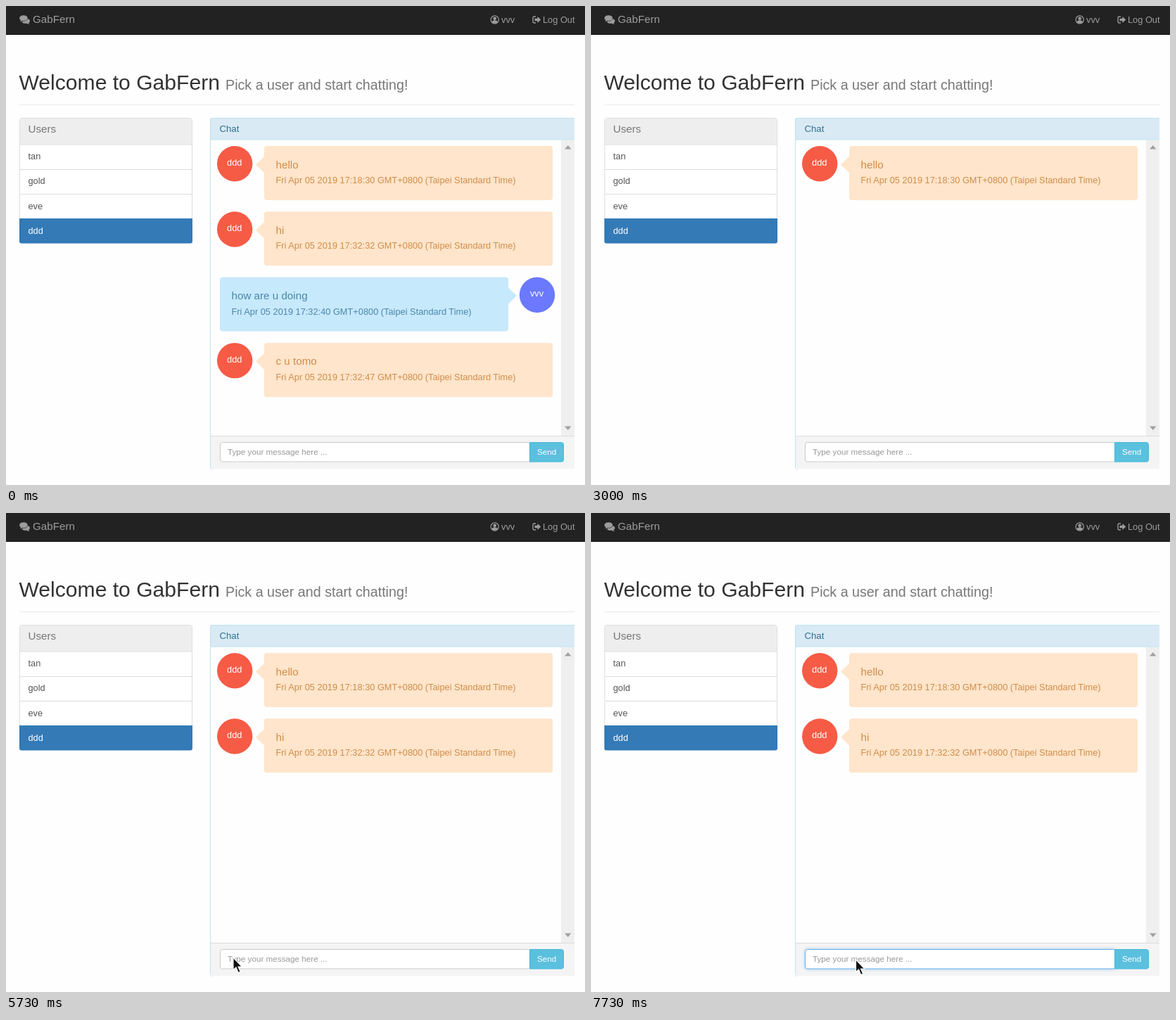
Write an HTML page that moves like this. It is 823 px wide and 681 px high and loops after 8000 ms.

```html
<!DOCTYPE html>
<html lang="en">
<head>
<meta charset="utf-8">
<title>Chat</title>
<style>
html, body { margin: 0; width: 100%; height: 100%; overflow: hidden; background: #fefefe; }
svg { display: block; font-family: "Liberation Sans", Arial, sans-serif; font-size: 12.8px; }
.head { font-size: 15.2px; }
.small { font-size: 11.7px; }
.mid { text-anchor: middle; }
</style>
</head>
<body>
<svg id="stage" width="823" height="681" viewBox="0 0 823 681"></svg>
<script>
const LOOP = 8000;
const APP = "GabFern", ME = "vvv", PEER = "ddd";
const FIELD_EDGE = "#cbcbcb", FOCUS_EDGE = "#66afe9";

const text = (x, y, s, fill, cls = "", size = "") =>
  `<text x="${x}" y="${y}" fill="${fill}" class="${cls}"${size && ` style="font-size:${size}px"`}>${s}</text>`;
const rect = (x, y, w, h, fill, extra = "") =>
  `<rect x="${x}" y="${y}" width="${w}" height="${h}" fill="${fill}" ${extra}/>`;
const path = (d, fill, extra = "") => `<path d="${d}" fill="${fill}" ${extra}/>`;
const circle = (x, y, r, fill, extra = "") =>
  `<circle cx="${x}" cy="${y}" r="${r}" fill="${fill}" ${extra}/>`;

function navbar() {
  const grey = "#9d9d9d";
  return rect(0, 0, 823, 41, "#222") + rect(0, 40, 823, 1, "#111")
    + path("M27 17.5c4 0 7 1.6 7 3.7 0 1.2-.8 2.2-2 2.9l1.5 1.9c-1.6 0-3-.5-4-1.2-3 .2-5.4-.4-6.7-1.6z", grey)
    + path("M25 13c3.4 0 6 1.9 6 4.2s-2.6 4.2-6 4.2l-1.5-.1c-1.1.8-2.3 1.2-3.8 1.3l1.3-2c-1.3-.8-2.1-2-2.1-3.4 0-2.3 2.7-4.2 6.1-4.2z", grey, 'stroke="#222" stroke-width=".6"')
    + text(38, 24, APP, grey, "head")
    + circle(694.7, 19.5, 5.6, "none", `stroke="${grey}" stroke-width="1.2"`)
    + circle(694.7, 17.7, 2.3, grey)
    + path("M690.5 23c.6-2 2-2.7 4.2-2.7s3.6.7 4.2 2.7q-4.2 3.6-8.4 0z", grey)
    + text(704, 24, ME, grey)
    + path("M753 15h-2q-2 0-2 2v5q0 2 2 2h2", "none", `stroke="${grey}" stroke-width="1.3"`)
    + path("M751.5 17.8h4v-2.8l4.7 4.5-4.7 4.5v-2.8h-4z", grey)
    + text(763, 24, "Log Out", grey);
}

function userList() {
  const names = ["tan", "gold", "eve", PEER];
  let s = rect(19.5, 159.5, 245, 177, "#fff", 'rx="3" stroke="#ddd"')
    + path("M20 197v-34q0-3 3-3h238q3 0 3 3v34z", "#eee")
    + text(31.5, 180, "Users", "#777", "head")
    + path("M19 197h246M19 232.5h246M19 267.5h246", "none", 'stroke="#ddd"')
    + path("M19 302h246v32.5q0 3-3 3h-240q-3 0-3-3z", "#337ab7");
  names.forEach((n, i) => s += text(31.5, 218 + 35.3 * i, n, i === 3 ? "#fff" : "#555"));
  return s;
}

function panel() {
  return rect(290, 159, 518, 499, "#fefefe")
    + path("M290 190v-28q0-3 3-3h515v31z", "#d9eaf5")
    + path("M808 159.5H293q-2.5 0-2.5 3v493q0 3 3 3M290 190h518", "none", 'stroke="#bce3ee"')
    + text(303.5, 179, "Chat", "#31708f", "", 13.2)
    + rect(789, 191, 19, 420, "#efefef")
    + path("M794 203.5h9.5l-4.75-5.5zM794 597.5h9.5l-4.75 5.5z", "#a0a0a0")
    + rect(291, 611, 517, 47, "#f4f4f4") + rect(291, 611, 517, 1, "#ddd")
    + rect(304.5, 620.5, 441, 27.5, "#fff", `id="field" rx="3" stroke="${FIELD_EDGE}"`)
    + text(315, 637.5, "Type your message here ...", "#999", "small")
    + rect(315, 627, 1, 14, "#333", 'id="caret"')
    + path("M744.5 620.5h45q3 0 3 3v21.5q0 3-3 3h-45z", "#5bc0de", 'stroke="#46b8da"')
    + text(755, 637.5, "Send", "#fff", "small");
}

function message(row, body, time, mine) {
  const y = 199 + 93.3 * row;
  const x = mine ? 304 : 367;
  const [bubble, ink, disc] = mine
    ? ["#c7e9fc", "#4a86ac", "#6a79fd"]
    : ["#ffe5cb", "#cf8c49", "#f65b46"];
  const cx = mine ? 755 : 325.2;
  const arrow = mine ? `M713 ${y + 14}l13 12.5-13 12.5z` : `M368 ${y + 14}l-13 12.5 13 12.5z`;
  return `<g class="msg">` + rect(x, y, 410, 77, bubble, 'rx="4"') + path(arrow, bubble)
    + circle(cx, y + 25.2, 25.2, disc)
    + text(cx - .5, y + 27.7, mine ? ME : PEER, "#fff", "mid")
    + text(x + 16.5, y + 31.5, body, ink, "head")
    + text(x + 16.5, y + 53, `Fri Apr 05 2019 ${time} GMT+0800 (Taipei Standard Time)`, ink)
    + `</g>`;
}

const stage = document.getElementById("stage");
stage.innerHTML = navbar()
  + text(18.5, 118.5, "Welcome to " + APP, "#333", "", 30.1)
  + text(312, 118.5, "Pick a user and start chatting!", "#777", "", 19.7)
  + rect(19, 140, 789, 1, "#e9e9e9")
  + userList() + panel()
  + message(0, "hello", "17:18:30")
  + message(1, "hi", "17:32:32")
  + message(2, "how are u doing", "17:32:40", true)
  + message(3, "c u tomo", "17:32:47")
  + path("M0 0V17.5L4 14L7.2 21.5L10.2 20.2L7 13H12.4Z", "#111", 'id="cursor" stroke="#fff" stroke-width="1.1"');

// The pointer jumps between stops: [time, x, y]; no position means hidden.
const stops = [
  [0], [270, -5, 8], [530], [5000, 76.5, 585], [5270, 311, 631], [5730, 323, 632],
  [6000, 399, 620], [6270, 419, 631], [6530, 376.5, 635]
];
const msgs = document.querySelectorAll(".msg");
const [cursor, field, caret] = ["cursor", "field", "caret"].map(id => document.getElementById(id));
const show = (el, on) => el.style.display = on ? "" : "none";

function draw(now) {
  const t = now % LOOP;
  const count = t < 270 ? 4 : t < 3530 ? 1 : 2;
  msgs.forEach((m, i) => show(m, i < count));

  const [, x, y] = stops.filter(s => s[0] <= t).pop();
  show(cursor, x !== undefined);
  if (x !== undefined) cursor.setAttribute("transform", `translate(${x} ${y})`);

  const focus = t >= 6730;
  field.setAttribute("stroke", focus ? FOCUS_EDGE : FIELD_EDGE);
  field.style.filter = focus ? "drop-shadow(0 0 2px rgba(102,175,233,.6))" : "";
  show(caret, focus && t < 7270);
}

const start = performance.now();
function tick() {
  draw(performance.now() - start);
  requestAnimationFrame(tick);
}
tick();
</script>
</body>
</html>
```
